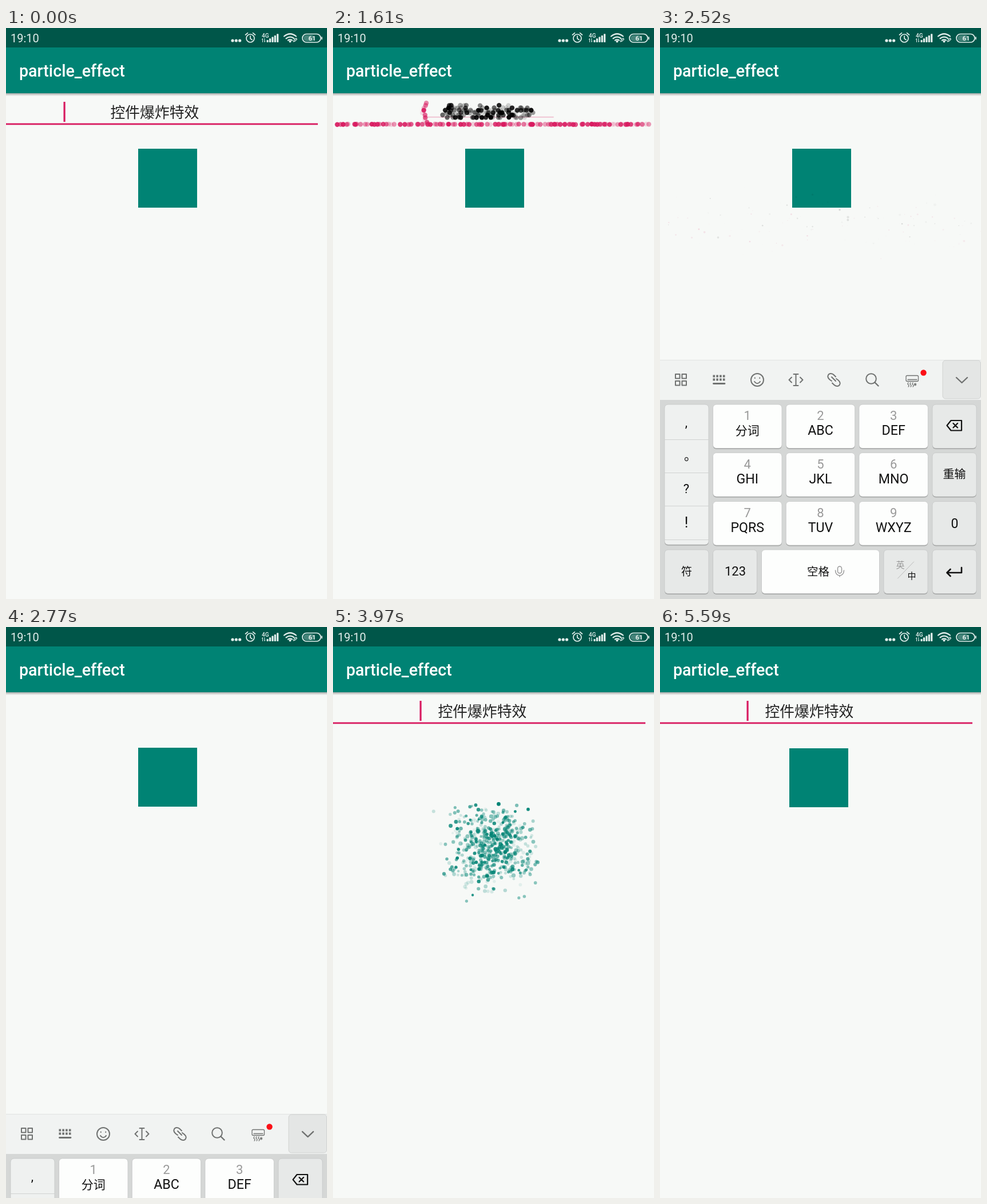
An HTML page with a canvas for the animation above (5830 ms loop, 561 by 998 pixels).

```html
<!DOCTYPE html>
<html lang="zh-CN">
<head>
<meta charset="utf-8">
<title>particle_effect</title>
<style>
html, body { margin: 0; width: 100%; height: 100%; overflow: hidden; background: #f7f9f7; }
svg, canvas { position: absolute; left: 0; top: 0; width: 561px; height: 998px; }
text { font-family: Roboto, "Noto Sans CJK SC", "Noto Sans CJK", sans-serif; }
.cjk { font-family: "Noto Sans CJK SC", "Noto Sans CJK", sans-serif; }
.mid { text-anchor: middle; }
.line { fill: none; stroke-linecap: round; stroke-linejoin: round; }

#edit, #cursor, #tile, #keyboard, #press { animation: 5830ms linear infinite; }
#edit { animation-name: edit; transform-origin: 272px 147px; }
#cursor { animation-name: blink; animation-timing-function: step-end; }
#tile { animation-name: tile; transform-origin: 277.5px 263.5px; }
#keyboard { animation-name: keyboard; }
#press { animation-name: press; animation-timing-function: step-end; }

@keyframes edit {
  0% { transform: translate(-1px, 0); animation-timing-function: step-end; }
  23.64% { transform: translate(8px, 1px); animation-timing-function: step-end; }
  24.2% { transform: translate(-10px, -1px); animation-timing-function: step-end; }
  24.8% { transform: translate(5px, 0); animation-timing-function: step-end; }
  25.5% { transform: translate(-6px, 1px); animation-timing-function: step-end; }
  26.21% { transform: none; opacity: 1; animation-timing-function: cubic-bezier(.37, 0, .63, 1); }
  28.78%, 53.17% { transform: scale(0); opacity: 0; animation-timing-function: cubic-bezier(.37, 0, .63, 1); }
  55.75%, 100% { transform: none; opacity: 1; }
}
@keyframes blink {
  0% { transform: translateX(-50px); opacity: 1; }
  7.89% { transform: translateX(-50px); opacity: 0; }
  16.47% { transform: translateX(-50px); opacity: 1; }
  21.96% { transform: none; opacity: 1; }
  28.8% { transform: none; opacity: 0; }
  61.58% { transform: none; opacity: 1; }
  70.15% { transform: none; opacity: 0; }
  78.73% { transform: none; opacity: 1; }
  87.31% { transform: none; opacity: 0; }
  95.88%, 100% { transform: none; opacity: 1; }
}
@keyframes tile {
  0% { transform: translate(5px, -1px); animation-timing-function: step-end; }
  57.12% { transform: translate(7px, 1px); animation-timing-function: step-end; }
  57.8% { transform: translate(3px, -2px); animation-timing-function: step-end; }
  58.5% { transform: translate(6px, 0); animation-timing-function: step-end; }
  59.1% { transform: translate(4px, -1px); animation-timing-function: step-end; }
  59.69% { transform: none; opacity: 1; animation-timing-function: cubic-bezier(.37, 0, .63, 1); }
  62.26%, 83.7% { transform: scale(0); opacity: 0; animation-timing-function: cubic-bezier(.37, 0, .63, 1); }
  86.28%, 100% { transform: none; opacity: 1; }
}
@keyframes keyboard {
  0%, 28.3% { transform: translateY(418px); animation-timing-function: ease-out; }
  32.25%, 44.46% { transform: none; animation-timing-function: cubic-bezier(.37, 0, .63, 1); }
  49.62%, 100% { transform: translateY(418px); }
}
@keyframes press {
  0% { opacity: 0; }
  43.2% { opacity: 1; }
  50%, 100% { opacity: 0; }
}
</style>
</head>
<body>
<svg viewBox="0 0 561 998">
  <defs>
    <linearGradient id="shade" x2="0" y2="1">
      <stop offset="0" stop-color="#000" stop-opacity=".32"/>
      <stop offset="1" stop-color="#000" stop-opacity="0"/>
    </linearGradient>
  </defs>

  <rect y="114" width="561" height="5" fill="url(#shade)"/>
  <rect y="34" width="561" height="80" fill="#008374"/>
  <rect width="561" height="34" fill="#005649"/>
  <text x="23" y="85.300" font-size="28.600" font-weight="500" fill="#fff">particle_effect</text>

  <g fill="#e3eeec">
    <text x="8" y="25.300" font-size="20">19:10</text>
    <circle cx="396" cy="22" r="2.600"/>
    <circle cx="402.300" cy="22" r="2.600"/>
    <circle cx="408.600" cy="22" r="2.600"/>
    <text x="447" y="16.500" font-size="10" font-weight="500">4G</text>
    <g id="bars"></g>
    <circle cx="496.500" cy="23.500" r="2"/>
    <rect x="520" y="12.500" width="19" height="10.500" rx="5" opacity=".3"/>
    <text class="mid" x="535" y="22" font-size="11.500" font-weight="700">61</text>
  </g>
  <g class="line" stroke="#e3eeec" stroke-width="1.700">
    <circle cx="427" cy="18" r="7"/>
    <path d="M427 14v4.500l3 2M418.500 12l4-3.300M435.500 12l-4-3.300"/>
    <path d="M448.500 24.500v-6l-1.200 1.500M451.800 18.500v6l1.200-1.500" stroke-width="1"/>
    <path d="M486 14.500q10.500-8.500 21 0M489.500 18.300q7-5.500 14 0M493 21.500q3.500-2.500 7 0" stroke-width="2.200"/>
    <path d="M502.500 24l1-3 3.500-3 1.500 1.500-3.500 3.500z" stroke-width="1.200"/>
    <rect x="518" y="10.500" width="32" height="14.500" rx="7.200"/>
    <path d="M552 16v3.500"/>
  </g>

  <g id="edit">
    <text class="cjk" x="183.500" y="156.700" font-size="25.800" fill="#222">控件爆炸特效</text>
    <rect x="-1" y="166.500" width="547" height="2.800" fill="#d81b60"/>
    <rect id="cursor" x="151.500" y="129" width="3.200" height="35" fill="#d81b60"/>
  </g>
  <rect id="tile" x="226" y="212" width="103" height="103" fill="#008374"/>
</svg>

<canvas width="561" height="998"></canvas>

<svg viewBox="0 0 561 998">
  <g id="keyboard">
    <rect y="580" width="561" height="418" fill="#d5d7d6"/>
    <rect y="580" width="561" height="70" fill="#f1f3f2"/>
    <path d="M0 580.500h561" stroke="#e2e4e3"/>
    <rect id="press" x="494" y="581" width="66.500" height="67" rx="5" fill="#e4e6e5" stroke="#d0d2d1"/>
    <g class="line" stroke="#707271" stroke-width="2">
      <path d="M27 605h7.500v7.500h-7.500zM38.500 605h7.500v7.500h-7.500zM27 617h7.500v7.500h-7.500zM38.500 617h7.500v7.500h-7.500z"/>
      <path d="M92.500 608.500h21M92.500 614.500h21" stroke-width="4" stroke-dasharray="3.600 2.200" stroke-linecap="butt"/>
      <path d="M93.500 621.500h19.500" stroke-width="2.800"/>
      <circle cx="170" cy="615" r="11"/>
      <path d="M165 618q5 6.500 10 0M165.800 611.500v.5M174.200 611.500v.5"/>
      <path d="M237.500 606v18M233.500 605h8M233.500 625h8M230 610.500l-4.500 4.500 4.500 4.500M245 610.500l4.500 4.500-4.500 4.500"/>
      <path d="M307 617l-7-7M300 617c-5-3-8-7-6-10.500s7-3 10 0l3 3M308 613c5 3 8 7 6 10.500s-7 3-10 0l-3-3"/>
      <circle cx="369" cy="613" r="8.800"/>
      <path d="M375.500 619.500l6 6M518 611l9.500 9 9.500-9" stroke-width="2.400"/>
      <g stroke-width="1.300">
        <rect x="430" y="607.500" width="21.500" height="10" rx="2"/>
        <path d="M433 614.500h16M434 620q-2 2 0 3.500t0 3.500M438 620q-2 2 0 3.500t0 3.500M442 620q-2 2 0 3.500t0 3.500M446 621v4M444.300 622l3.400 2M447.700 622l-3.400 2"/>
      </g>
    </g>
    <circle cx="460.500" cy="602.500" r="5.200" fill="#fb0f16"/>
    <g id="keys"></g>
    <path d="M8 719.500h77M8 777.500h77M8 835.500h77M8 894.500h77" stroke="#d0d2d1"/>
    <g class="line" stroke="#111" stroke-width="2.200">
      <path d="M508.500 686h18.500v17.500h-18.500l-7-8.700zM512.500 691l7.500 7.500M520 691l-7.500 7.500"/>
      <path d="M527 943v9h-25M507.500 946l-6 6 6 6" stroke-width="2.600"/>
    </g>
    <g class="line" stroke="#999" stroke-width="1.500">
      <rect x="310.500" y="941" width="7" height="12" rx="3.500"/>
      <path d="M306.500 948c0 12 15 12 15 0M314 957v2"/>
      <path d="M415.500 962l28-29" stroke="#bbb" stroke-width="1"/>
    </g>
  </g>
</svg>

<script>
const LOOP = 5830, LIFE = 1024, STEP = 4.2;
const $ = s => document.querySelector(s);

$('#bars').innerHTML = [0, 1, 2, 3, 4].map(i => {
  const h = 4 + i * 2.7;
  return `<rect x="${455.5 + i * 4.4}" y="${25 - h}" width="3.2" height="${h}" rx=".8"/>`;
}).join('');

const label = (x, y, size, s, fill = '#111', weight = 400) =>
  `<text class="mid" x="${x}" y="${y}" font-size="${size}" font-weight="${weight}" fill="${fill}">${s}</text>`;
const key = (x, y, w, h, fill = '#fdfefd') =>
  `<rect x="${x}" y="${y + 1.5}" width="${w}" height="${h}" rx="6" fill="#9fa1a0"/>` +
  `<rect x="${x}" y="${y}" width="${w}" height="${h}" rx="6" fill="${fill}" stroke="#c3c5c4" stroke-width=".7"/>`;

function buildKeys() {
  const gray = '#e7e9e8', rowY = [658, 742.5, 827.5, 912];
  let out = key(8, 658, 77, 245, '#eff1f0');
  [',', '。', '?', '!'].forEach((s, i) =>
    out += label(i === 1 ? 53 : 46, [697, 755, 813, 873][i], i === 3 ? 26 : 22, s));
  ['分词', 'ABC', 'DEF', 'GHI', 'JKL', 'MNO', 'PQRS', 'TUV', 'WXYZ'].forEach((s, i) => {
    const x = 92.5 + i % 3 * 127.7, y = rowY[i / 3 | 0];
    out += key(x, y, 120.5, 76.5) + label(x + 60.3, y + 27, 22, i + 1, '#999') +
      label(x + 60.3, y + 53, i ? 23.2 : 21, s);
  });
  rowY.forEach(y => out += key(476, y, 77, 76.5, gray));
  [8, 92.5, 391].forEach(x => out += key(x, 912, 77, 76.5, gray));
  return out + key(177.5, 912, 206, 76.5) +
    label(514.5, 787, 20, '重输', '#111', 500) + label(515, 874, 23, 0) +
    label(46.5, 957, 19, '符') + label(131.5, 957, 22, 123) +
    label(276.5, 957, 19.5, '空格', '#111', 500) +
    label(420, 944, 15, '英', '#999') + label(440, 963, 15, '中', '#111', 500);
}
$('#keys').innerHTML = buildKeys();

let seed = 20;
function rand() {
  seed = (seed * 1664525 + 1013904223) >>> 0;
  return seed / 4294967296;
}
const gauss = () => (rand() + rand() + rand() + rand() - 2) * Math.sqrt(3);
const dot = (x, y, color) => ({
  x, y, color, gx: gauss(), gy: gauss(), gr: gauss(), alpha: .1 + .9 * rand(), fade: 1 + rand()
});

// Dots on a grid, each kept with probability keep(row)
function grid(x, y, cols, rows, color, keep) {
  const dots = [];
  for (let j = 0; j < rows; j++)
    for (let i = 0; i < cols; i++)
      if (rand() < keep(j)) dots.push(dot(x + i * STEP, y + j * STEP, color));
  return dots;
}

const bursts = [
  { start: 1570, w: 561, h: 55, steps: 31, dots: [
    ...grid(8.5, 168, 130, 1, '#d81b60', () => .92),
    ...grid(162, 131, 1, 9, '#d81b60', () => 1),
    ...grid(195, 135, 37, 6, '#000', j => j ? .52 : .22)
  ] },
  { start: 3480, w: 103, h: 103, steps: 43, dots: grid(229.5, 210, 24, 24, '#008374', () => 1) }
];

const ctx = $('canvas').getContext('2d');

// Closed form of a random walk whose step length grows with p
function drawBurst({ start, w, h, steps, dots }, t) {
  const p = (t - start) / LIFE;
  if (p < 0 || p >= 1) return;
  const spread = Math.sqrt(steps * p ** 3 / 3), fall = steps * p * p / 2;
  for (const d of dots) {
    const r = 4.2 - .26 * (fall + d.gr * spread);
    if (r <= 0) continue;
    ctx.globalAlpha = d.alpha * Math.min(1, (1 - p) * d.fade);
    ctx.fillStyle = d.color;
    ctx.beginPath();
    ctx.arc(d.x + d.gx * spread * w / 6, d.y + h / 4 * fall + d.gy * spread * h / 7, Math.min(r, 4.2), 0, 7);
    ctx.fill();
  }
}

let origin;
function frame(now) {
  origin ??= now;
  const t = (now - origin) % LOOP;
  ctx.clearRect(0, 0, 561, 998);
  bursts.forEach(b => drawBurst(b, t));
  requestAnimationFrame(frame);
}
requestAnimationFrame(frame);
</script>
</body>
</html>
```
